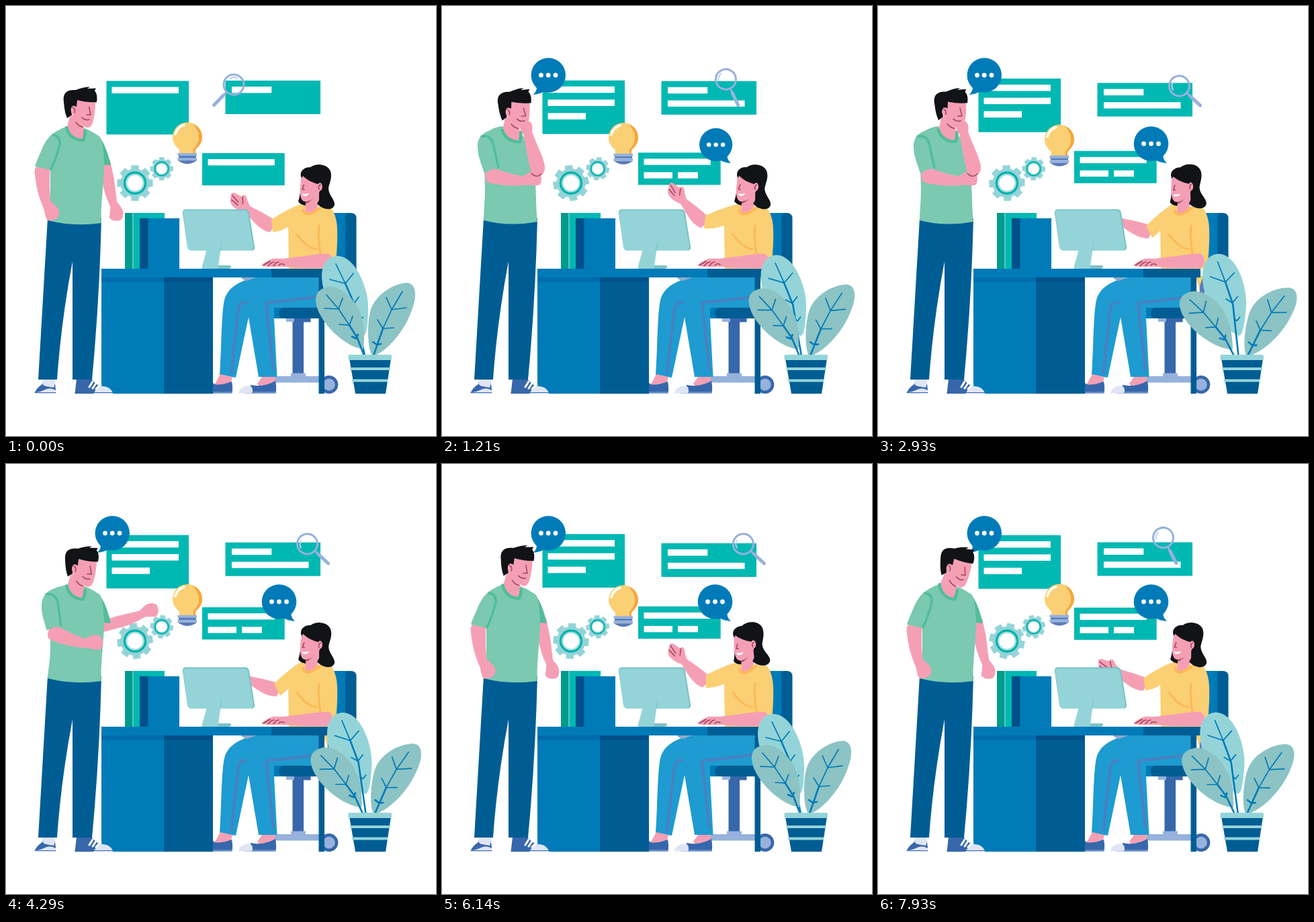
Write an HTML page that moves like this. It is 640 px wide and 640 px high and loops after 8000 ms.

```html
<!DOCTYPE html>
<html lang="en">
<head>
<meta charset="utf-8">
<title>Office discussion</title>
<style>
  html, body { margin: 0; width: 100%; height: 100%; overflow: hidden; background: #fff; }
  svg { display: block; width: 100vw; height: 100vh; }
  .navy { fill: #005d94 } .blue { fill: #007bb8 } .teal { fill: #00b8b2 } .aqua { fill: #94d4d8 }
  .sage { fill: #8cc3c4 } .skin { fill: #f59fb5 } .hair { fill: #111317 } .shirt { fill: #7ac9b0 }
  .jade { fill: #50bd9a } .sun { fill: #fbcf73 } .ice { fill: #96b1dc } .steel { fill: #3767ab }
  .white { fill: #fff } .jeans { fill: #1e9bd0 } .pale { fill: #dfe5f5 }
  .line { fill: none; stroke-linecap: round; stroke-linejoin: round }
  .ink { stroke: #9f4257; stroke-width: 1.5 } .fold { stroke: #50bd9a; stroke-width: 3.5 }
  .amber { stroke: #fbb957; stroke-width: 3 } .seam { stroke: #4b80c1; stroke-width: 4 }
  .vein { stroke: #007bb8; stroke-width: 1.7 } .stem { stroke: #007bb8; stroke-width: 2.6 }
</style>
</head>
<body>
<svg viewBox="0 0 640 640">
  <g id="card1"><path class="teal" d="M149.5 111.5h122.5v79.7h-122.5z"/>
    <path class="white" d="M157.5 120.5h99.5v9.5h-99.5z"/>
    <rect class="white" id="bar1" x="157.5" y="140" height="9.5"/><rect class="white" id="bar2" x="157.5" y="160" height="9.5"/></g>
  <g id="card2"><path class="teal" d="M326.5 111h141.5v50h-141.5z"/>
    <path class="white" d="M336 120h59.3v9.5h-59.3z"/><rect class="white" id="bar3" x="336" y="139.8" height="9.3"/></g>
  <g id="card3"><path class="teal" d="M292 219h122.7v48h-122.7z"/>
    <path class="white" d="M300.5 228h99.3v9.3h-99.3z"/>
    <rect class="white" id="bar4" x="300.5" y="248" height="9.3"/><rect class="white" id="bar5" x="351" y="248" height="9.3"/></g>

  <g id="lens"><circle r="15" fill="none" stroke="#96b1dc" stroke-width="3"/>
    <path class="line" d="M-10.500 3Q-9 9 -3 10.500" stroke="#c3cfea" stroke-width="2"/>
    <path class="line" d="M16 0H22" stroke="#96b1dc" stroke-width="3"/>
    <path class="line" d="M22 0H42.5" stroke="#96b1dc" stroke-width="5"/></g>

  <g id="gears"></g>

  <g id="bulb">
    <path class="sun" d="M258 220V214C253 209 248 204 248 195A22 22 0 0 1 292 195C292 204 286 209 282 214V220Z"/>
    <path d="M278 175A22 22 0 0 1 292 195C292 204 286 209 282 214V220H279V213C287 205 293 192 278 175Z" fill="#f5a63d"/>
    <path class="line" d="M252 191Q255 180 265 177" stroke="#fff" stroke-width="3.5"/>
    <rect class="ice" x="255.5" y="219" width="28.5" height="4"/>
    <rect class="steel" x="257" y="223" width="26" height="3" opacity=".85"/>
    <rect class="ice" x="255.5" y="226" width="28.5" height="4"/>
    <path fill="#5b7ab9" d="M256 230H284Q277 235 270 235T256 230Z"/>
  </g>

  <g id="bubble1"><circle class="blue" cx="158.3" cy="103" r="25.7"/><path class="blue" d="M141 118Q142 127 135.500 132Q147 131 154 126Z"/>
    <g class="white"><circle cx="147.5" cy="103" r="3.4"/><circle cx="158.2" cy="103" r="3.4"/><circle cx="169" cy="103" r="3.4"/></g></g>
  <g id="bubble2"><circle class="blue" cx="406.5" cy="205" r="25.8"/><path class="blue" d="M424 220Q424 229 430 234Q418 233 411 228Z"/>
    <g class="white"><circle cx="395.5" cy="205" r="3.4"/><circle cx="406.5" cy="205" r="3.4"/><circle cx="417.500" cy="205" r="3.4"/></g></g>

  <!-- chair -->
  <path class="blue" d="M486 308H512V404H486Z"/><path class="navy" d="M510 308H513Q521.500 308 521.500 316V404H505V315Q505 308 510 308Z"/>
  <path d="M478 404H488L486 428L479 432Z" fill="#5a7fbd"/>
  <path class="sun" d="M472 402H484L478 419Z"/>
  <path class="ice" d="M417 463H432V470H417Z"/><path class="steel" d="M429 463H453.500V470.500H429ZM426.500 470H443V548H426.500Z"/>
  <path class="ice" d="M399 551H468V560.500H399ZM424 546.500H446V553H424Z"/>
  <circle class="steel" cx="480.800" cy="563.500" r="13.500"/><circle class="ice" cx="480.800" cy="563.500" r="9"/>
  <path class="blue" d="M398 449H420V465H398Z"/><path class="navy" d="M413 449H470V465H413Q406 464 406 457T413 449Z"/>

  <!-- woman -->
  <path class="sun" d="M440 295Q460 299 483 300Q492 310 493 332C494 355 491 375 491 391H421L420 325Q425 300 440 295Z"/>
  <g id="wForearm"><path class="skin" d="M-6 11L20 9L42 6L49 10L56 15Q61 15 60 11L64 10L72 9Q77 7 75 4L73 0L70 -5Q66 -9 60 -9Q50 -9 43 -5C27 -9 10 -15 -4 -9Z"/>
    <path class="line ink" d="M59 11L53 3M73 4L60 1M70 -2L58 -3"/></g>
  <path class="sun" id="wSleeve"/>
  <path class="line amber" d="M433 340Q447 360 462 362M466 327Q464 347 468 369"/>
  <g id="wHead">
    <path class="hair" d="M440 255Q439 278 435 291Q439 297 449 297L460 284L468 292L476 270L474 248Z"/>
    <path class="skin" d="M447 287L466 276V295Q458 311 445 307L446 294Z"/>
    <path class="line" d="M442 304Q446 317 467 301" stroke="#fbb957" stroke-width="4"/>
    <path class="skin" d="M440 250L470 257L467 276C461 287 450 292 444 291C438 289 437 280 438 268Z"/>
    <path d="M447 291Q455 290 460 284Q456 289 447 294Z" fill="#9f4257"/>
    <path class="hair" d="M440 256C435 247 444 239 453 240C462 233 479 235 483 246C486 256 481 264 480 271C480 282 490 288 489 296C486 306 470 303 463 294C470 285 468 275 471 266C460 265 449 260 442 253Z"/>
    <ellipse class="skin" cx="467.300" cy="269" rx="3.500" ry="6"/><path class="line ink" d="M466 273Q464 268 468 266M443.500 266L441 273H444"/>
    <path class="white" d="M440.500 279Q446 281 451 278.500Q449 284 442 282.500Z"/>
  </g>
  <path class="jeans" d="M466 404H372C345 409 329 421 325 438C321 455 321 500 318 549L342 553L361 463L376 552H403.500L399 465V449H466Z"/>
  <path class="line seam" d="M463 433L405 440Q387 440 387 443L398 541M357 441Q348 441 346 450L335 546"/>
  <path d="M350 404H372L359 409Q352 408 350 404Z" fill="#91a9cb"/>
  <path class="skin" d="M319 548L337 552L335 560L309 566ZM381 552H401L399 561L377 566L374 562Z"/>
  <path class="steel" d="M308 561Q313 567 336 559Q338 568 336.500 576.500H308ZM364 564Q383 568 401 558Q403 568 401.500 576.500H355Z"/>
  <path class="pale" d="M346 576.500Q347 566 364 565Q369 571 366 576.500Z"/>
  <path class="line" d="M308 575H336M367 575H401" stroke="#96b1dc"/>

  <!-- desk -->
  <path class="navy" d="M465.500 404H474V577H465.500Z"/>
  <path class="blue" d="M142 391H480V404H235V577H142Z"/><path class="navy" d="M395 391H480V404H395ZM235 404H308V577H235Z"/>
  <path d="M142 404H235V411H142Z" fill="#006cab"/><path d="M235 404H308V411H235Z" fill="#00518a"/>
  <path class="teal" d="M177 308H236V391H177Z"/><path d="M177 308H189V391H177Z" fill="#009b8d"/><path d="M188 308H190V391H188Z" fill="#55c9bd"/>
  <path class="blue" d="M199 316H258V391H199Z"/><path d="M199 316H211V391H199Z" fill="#00508a"/><path class="line" d="M211.500 316V391" stroke="#0067a5"/>
  <path class="aqua" d="M299 362L321 352L316 387H292Z"/>
  <path class="aqua" d="M292 386H331Q335 386 335 388T331 391H292Z"/><path d="M316 386H331Q335 386 335 388T331 391H316Z" fill="#7dc2c6"/>
  <path d="M268 302.500H356Q361 302.500 362 308L370 358Q371 364 365 364H277Q271 364 270 358L263 309Q262 302.500 268 302.500Z" fill="#79c3c8"/>
  <path class="aqua" d="M268 304.500H354Q359 304.500 360 309L368 358Q368 364 363 364H277Q271 364 270 358L264 309Q264 304.500 268 304.500Z"/>
  <path class="line" d="M321 352L319 364" stroke="#79c3c8"/>
  <path class="skin" d="M481 369C465 368 445 373 413 376L397 376Q386 380 380 386Q386 389 413 388Q445 391 480 390C488 385 487 373 481 369Z"/>
  <path class="line ink" d="M383 386L393 380M390 387Q395 381 399 381M398 387Q402 381 406 381M406 386Q409 382 414 385"/>

  <!-- man -->
  <path class="pale" d="M55 555H73L74 577H43Q45 571 54 567Z"/>
  <path class="steel" d="M54 559Q54 565 60 566L71 568L73 562L74 572Q66 567 58 571T43 575Q46 568 54 563ZM105 555H127Q136 565 142 567L138 577H102.500Z"/>
  <path class="pale" d="M137 566Q155 564 159.500 577H130Z"/>
  <path class="line" d="M124 567L129 559M129 569L135 560M134 570L141 563" stroke="#fff" stroke-width="3"/>
  <path class="line" d="M43 575.500H74M103 575.500H159" stroke="#3767ab"/>
  <path class="navy" d="M62 316H142Q139 440 128 556H99V380Q82 470 76 556H48Z"/>
  <g id="mBackArm">
    <g id="mBackForearm"><path class="skin" d="M-10 -8L20 -8L54 -5Q64 -11 70 -11Q80 -10 81.500 -4Q82 7 74 11Q67 8 59 6Q37 11 22 10L-10 8Z"/></g>
    <path class="jade" d="M137 192C147 204 152 220 156 237L143 236Z"/>
  </g>
  <path class="shirt" id="mTorso"/>
  <g id="mForearm"><path class="skin" d="M0 -12C15 -8 25 -5 50 -2C58 -9 66 -13 71 -11C78 -8 80 0 77 8Q73 11 60 10C45 13 30 15 12 13Q1 13 -3 10Q-9 0 0 -12Z"/></g>
  <path class="shirt" id="mSleeve"/><path class="line fold" id="mFold"/>
  <g id="mHead">
    <path class="skin" d="M96 160L91 180Q97 197 114 199L117 196L116 179L110 174Z"/>
    <path class="line" d="M90 181Q95 199 115 200Q118 193 117.500 186" stroke="#50bd9a" stroke-width="4.500"/>
    <path class="skin" d="M101 137L133 139Q133 160 130 170C128 179 124 183 118 180Q105 172 99 163Z"/>
    <path class="hair" d="M86 143C84 129 91 124 104 125Q116 120 125 120.500L121 123L134 122.500L132 126Q137 132 135 143Q122 144 106 140L105 150Q98 146 97 154L98 162L91 167Q87 158 86 143Z"/>
    <ellipse class="skin" cx="100.500" cy="155" rx="4" ry="6.500"/>
    <path class="line ink" d="M99 151Q104 153 102 159M123.500 150L126 162H120M113 166Q118 171 124 169M104 173Q108 179 114 180"/>
  </g>
  <g id="mFrontArm"><path class="skin" d="M134 187C140 205 150 222 153 238C154 249 148 254 140 253Q133 252 130 238L121 190C115 186 116 180 119 177Q124 170 131 172Q136 176 134 187Z"/>
    <path class="line ink" d="M133 249Q141 257 148 250"/></g>

  <!-- plant -->
  <g id="leafMid"><path class="aqua" d="M532 491C505 482 470 440 470 402C470 382 481 372 493 372C520 372 539 420 539 448Q539 490 532 491Z"/>
    <path class="line stem" d="M535 526L519 445L505 413"/><path class="line vein" d="M505 413L491 384M482 407L505 413L517 398M508 438L518 443L525 433M523 466L527 469L531 463"/></g>
  <g id="leafLeft"><path class="sage" d="M532 511C500 506 461 465 461 437Q461 420 483 418C507 419 533 450 533 488Q533 505 532 511Z"/>
    <path class="line stem" d="M535 526L523 494L511 475M515 492L521 495L524 489"/><path class="line vein" d="M511 475L495 451L477 430M474 450L495 451L501 435M496 474L511 475L516 462"/></g>
  <g id="leafRight"><path class="sage" d="M546 521C538 514 537 474 542 455C549 428 580 412 597 412C611 413 611 432 606 446C596 483 565 516 546 521Z"/>
    <path class="line stem" d="M545 526L561 480M546 500L552 504L558 503"/><path class="line vein" d="M561 480L574 452L590 425M566 434L574 452L596 449M553 467L561 480L577 479"/></g>
  <path class="navy" d="M511 525H573L565 577H520Z"/>
  <path class="aqua" d="M512 538H572L571.400 542H512.600ZM514.500 555.500H568.500L568 559.500H515.300Z"/>
  <rect class="aqua" x="509.500" y="519" width="64.500" height="8" rx="2"/>
</svg>
<script>
const LOOP = 8000, FPS = 14, SWING = 6000;
const el = {};
const collect = () => document.querySelectorAll('[id]').forEach(e => el[e.id] = e);
collect();

const wave = u => (1 - Math.cos(Math.PI * u)) / 2;
const clamp = u => Math.min(1, Math.max(0, u));
const ramp = (t, from, to) => clamp((t - from) / (to - from));
const easeOut = u => 1 - (1 - u) ** 2;
const lerp = (a, b, u) => a + (b - a) * u;

// Eased value of a [time, value] table.
function track(t, keys) {
  const i = keys.findIndex(k => k[0] > t);
  if (i < 0) return keys.at(-1)[1];
  const [a, b] = [keys[i - 1], keys[i]];
  return lerp(a[1], b[1], wave(ramp(t, a[0], b[0])));
}

// Blend two paths that share the same commands.
function blend([a, b], u) {
  const ends = b.match(/-?[\d.]+/g);
  let i = 0;
  return a.replace(/-?[\d.]+/g, n => lerp(+n, +ends[i++], u).toFixed(2));
}

const place = (id, transform) => el[id].setAttribute('transform', transform);
const move = (id, x, y) => place(id, `translate(${x} ${y})`);
const spin = (id, a, x = 0, y = 0, dy = 0) => place(id, `translate(0 ${dy}) rotate(${a} ${x} ${y})`);
const joint = (id, x, y, a) => place(id, `translate(${x} ${y}) rotate(${a})`);
const grow = (id, x, y, s) => place(id, `translate(${x} ${y}) scale(${s}) translate(${-x} ${-y})`);

function gear(id, x, y, r) {
  let teeth = '';
  for (let a = 0; a < 360; a += 45)
    teeth += `<path d="M-6 -19L-5.500 -26.500H5.500L6 -19Z" transform="rotate(${a})"/>`;
  return `<g transform="translate(${x} ${y}) scale(${r / 27})"><g class="aqua" id="${id}">${teeth}<circle r="21.500"/></g>
    <circle r="15.500" fill="#fff" stroke="#00b3ac" stroke-width="3.500"/>
    <circle r="12.500" fill="#fff" stroke="#94d4d8" stroke-width="1.500"/></g>`;
}
el.gears.innerHTML = gear('gearBig', 192, 263.5, 27) + gear('gearSmall', 231.7, 242.3, 17.5);
collect();

const SLEEVE = [
  'M90 181C68 186 60 198 53 214C48 226 45 232 43 239Q54 241 66 244C74 226 80 215 80 204L96 190Z',
  'M85 181C62 186 53 194 53 209C53 224 59 236 63 249Q72 243 84 241C84 226 80 205 74 198L96 190Z'];
const FOLD = ['M70 192Q81 194 80 205Q76 224 67 243', 'M59 194Q73 191 77 208Q80 225 84 240'];
const TORSO = [
  'M92 179C75 183 66 195 66 215L66 270C66 295 62 310 62 319Q100 329 142 323C140 300 146 265 146 233C145 212 143 200 140 195Q128 186 117 182Z',
  'M88 179C66 183 58 195 62 215L64 270C64 292 62 305 62 319Q100 329 142 321C140 305 140 280 139 262C136 240 132 225 128 205Q120 190 108 182Z'];
const W_SLEEVE = [
  'M440 295C425 298 405 306 392 312L390 331C405 332 413 329 424 325L442 320Z',
  'M440 295C430 298 412 315 399 327L408 345C415 340 420 335 428 325L442 320Z'];

const MAN = {
  think: [[0, 0], [900, 1], [3430, 1], [4200, 0]],
  bend: [[0, 0], [950, 1], [3430, 1], [4250, .88], [4340, .88], [5070, .04], [6000, 0]],
  reach: [[0, 78], [900, -104], [3430, -104], [4200, -18], [4340, -18], [5070, 78]],
  head: [[0, 0], [900, -3], [1210, -3], [1710, -2.2], [3430, -2.2], [4290, 2.5], [5070, 7], [5300, 7], [5950, 1], [6140, 2], [6900, 8.5]],
  drop: [[0, 0], [900, 3], [1710, 2.5], [3430, 2.5], [4290, 1], [5070, 0]]
};
const WOMAN = {
  sleeve: [[0, .4], [1210, 0], [2640, 1], [4290, 1], [5070, .3], [6140, .15], [7930, .45]],
  arm: [[0, 35], [1210, 45], [2640, 19.5], [4290, 19.5], [5070, 50], [6140, 43], [7930, 24]],
  head: [[0, 0], [1210, .5], [2900, -3], [4290, .3], [5070, .5], [6140, -6.5], [7200, .5]]
};

function board(t) {
  const p = wave(t / SWING);
  move('card1', 0, -7.2 * p);
  move('card2', 0, 7.1 * p);
  move('card3', 0, -7 * p);
  move('bulb', 0, 7.3 * p);
  const bar = (id, width, from, to) => el[id].setAttribute('width', width * wave(ramp(t, from, to)));
  bar('bar1', 99.5, 0, 550);
  bar('bar2', 56.5, 500, 1000);
  bar('bar3', 114.5, 0, 800);
  bar('bar4', 42.5, 0, 500);
  bar('bar5', 30, 450, 900);
  grow('bubble1', 136, 132, easeOut(ramp(t, 350, 1100)));
  grow('bubble2', 430, 234, easeOut(ramp(t, 550, 1400)));

  const q = t < SWING ? 1 - (1 - ramp(t, 0, 3000)) ** 2.77 : 1 - .53 * ((t - SWING) / 3000) ** 2;
  joint('lens', 339 + 109.5 * q, 117 + 2 * q - 52 * q * (1 - q), 134 - 91 * q);
  spin('gearBig', t * .03);
  spin('gearSmall', -t * .03);
}

function man(t) {
  const think = track(t, MAN.think), bend = track(t, MAN.bend), reach = track(t, MAN.reach);
  el.mTorso.setAttribute('d', blend(TORSO, think));
  el.mSleeve.setAttribute('d', blend(SLEEVE, bend));
  el.mFold.setAttribute('d', blend(FOLD, bend));
  joint('mForearm', lerp(54, 70, bend), lerp(242, 251, bend), lerp(78, 5, bend));
  joint('mBackForearm', 149, 240, reach);
  spin('mFrontArm', reach + 104, 142, 243);
  const front = reach < -60;
  el.mFrontArm.style.display = front ? '' : 'none';
  el.mBackArm.style.display = front ? 'none' : '';
  spin('mHead', track(t, MAN.head), 103, 190, track(t, MAN.drop));
}

function woman(t) {
  const s = track(t, WOMAN.sleeve);
  el.wSleeve.setAttribute('d', blend(W_SLEEVE, s));
  joint('wForearm', lerp(389, 402, s), lerp(321, 336, s), 180 + track(t, WOMAN.arm));
  spin('wHead', track(t, WOMAN.head), 458, 300);
}

// The leaves sway about points inside the pot.
function plant(t) {
  const p = wave(2 * t / SWING);
  spin('leafMid', 5 * p, 535, 550);
  spin('leafLeft', -6.5 * p, 533, 548);
  spin('leafRight', 7.3 * p, 546, 545);
}

function draw() {
  const step = Math.floor(performance.now() % LOOP * FPS / 1000 + .06);
  const t = step * 1000 / FPS % LOOP;
  board(t);
  man(t);
  woman(t);
  plant(t);
  requestAnimationFrame(draw);
}
draw();
</script>
</body>
</html>
```
